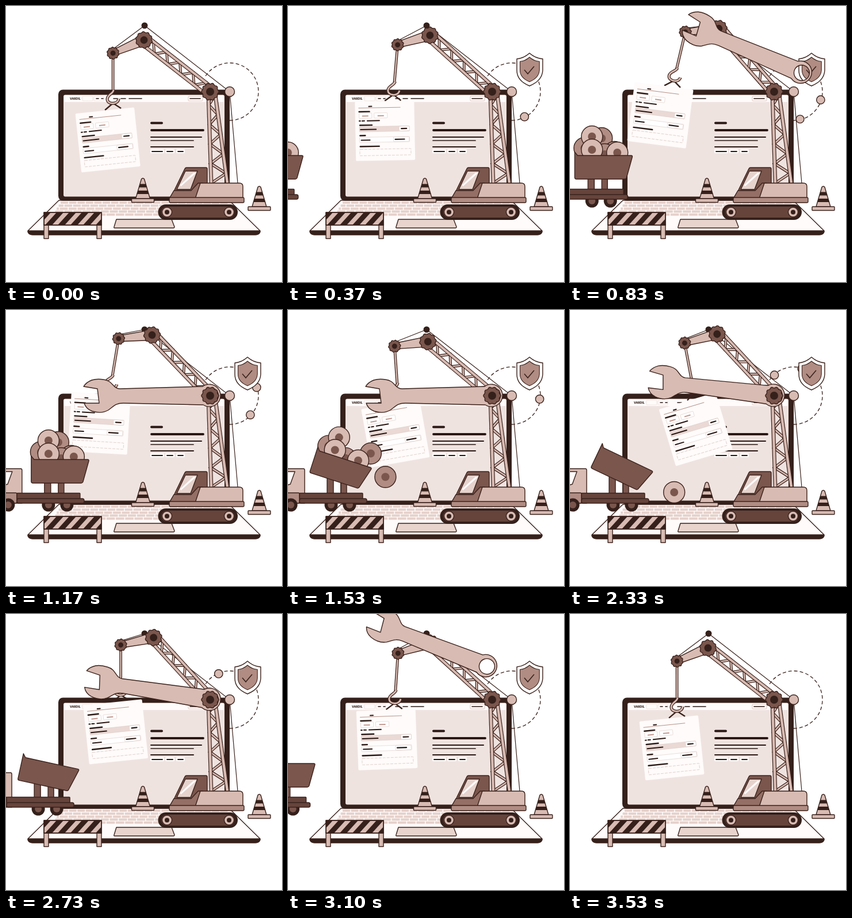
Recreate the animation shown at these times as an HTML page. Size 480x480 px, loop 3560 ms.

```html
<!DOCTYPE html>
<html lang="en">
<head>
<meta charset="utf-8">
<title>Site under construction</title>
<style>
  html, body { margin: 0; width: 100%; height: 100%; overflow: hidden; background: #fff; }
  svg { display: block; width: 100vw; height: 100vh; }
  .o { stroke: #3b221c; stroke-width: 1.4; stroke-linejoin: round; }
  .n { fill: none; }
  .dark { fill: #35201b; }
  .deep { fill: #66443b; }
  .brown { fill: #7a564d; }
  .mid { fill: #b08c83; }
  .light { fill: #d8bbb2; }
  .pale { fill: #fefbfa; }
  text { font: 800 5px Inter, Arial, sans-serif; fill: #35201b; }
</style>
</head>
<body>
<svg id="stage" viewBox="0 0 480 480"></svg>
<script>
const LOOP = 3560, INK = '#3b221c', PINK = '#d8bbb2';
const stage = document.getElementById('stage');

// Markup helpers
const path = (d, cls, extra = '') => `<path d="${d}" class="${cls}" ${extra}/>`;
const rect = (x, y, w, h, cls, r = 0, extra = '') =>
  `<rect x="${x}" y="${y}" width="${w}" height="${h}" rx="${r}" class="${cls}" ${extra}/>`;
const disc = (x, y, r, cls) => `<circle cx="${x}" cy="${y}" r="${r}" class="${cls}"/>`;
const line = (d, w, color = INK, extra = '') =>
  `<path d="${d}" fill="none" stroke="${color}" stroke-width="${w}" ${extra}/>`;
const bar = (d, w) => line(d, w + 2.4) + line(d, w, PINK);
const dash = (x, y, w, h = 2) => line(`M${x},${y}h${w}`, h, '#2a1814', 'stroke-linecap="round"');
const group = (id, body, extra = '') => `<g id="${id}" ${extra}>${body}</g>`;
const range = n => [...Array(n).keys()];

function gear(x, y, r, core) {
  const pts = range(72).map(i => {
    const a = i * Math.PI / 36, q = r * (.95 + .06 * Math.cos(10 * a));
    return (x + q * Math.cos(a)).toFixed(1) + ',' + (y + q * Math.sin(a)).toFixed(1);
  });
  return path('M' + pts.join('L') + 'Z', 'brown o') + disc(x, y, core, 'dark');
}

// Two rails, each [x1, y1, x2, y2], joined by a zigzag
function truss(a, b, steps, w) {
  const zig = range(steps + 1).map(i => {
    const [x1, y1, x2, y2] = i % 2 ? a : b, k = i / steps;
    return `${x1 + (x2 - x1) * k},${y1 + (y2 - y1) * k}`;
  });
  const rail = r => bar(`M${r[0]},${r[1]}L${r[2]},${r[3]}`, w);
  return bar('M' + zig.join('L'), w * .6) + rail(a) + rail(b);
}

const cone = (x, y) => `<g transform="translate(${x},${y})">` +
  path('M7,35L17,1Q19.5,-2 22,1L32,35Z', 'light o') +
  path('M14.5,9.5h10l2,6h-14zM11,21h17l2,6h-21z', 'dark') +
  rect(0, 35, 39, 6.5, 'light o', 1) + '</g>';

const laptop =
  path('M92,338H388L442,391H38Z', 'pale o') +
  path('M38,391.5H442V393Q440,398 434,398H46Q40,398 38,393Z', 'dark o') +
  range(5).map(i => line(`M${95 - i * 3.4},${342 + i * 5.2}H${386 + i * 3}`, 4, '#e6d1cb',
    `stroke-dasharray="${13 + i * .4} 1.6" stroke-dashoffset="${i * 5}"`)).join('') +
  path('M192,371H288L293,384Q293,386 291,386H189Q187,386 188,384Z', 'o', 'fill="#e8d4cc"') +
  rect(91, 145.5, 298, 193, 'dark', 8) +
  rect(100, 154.5, 280, 177, '', 3, 'fill="#efe3e0"') +
  rect(101, 155, 278, 12, 'pale', 2) +
  '<text x="111" y="163">VARDIL</text>' +
  rect(133, 157, 18, 8, 'n', 1, 'stroke="#eadbd7" stroke-width=".7"') +
  rect(153, 157, 17, 8, 'n', 1, 'stroke="#eadbd7" stroke-width=".7"') +
  dash(157, 161, 4, 1.6) + dash(166, 161, 3, 1.6) + dash(187, 161, 7, 1.6) +
  dash(200, 161, 8, 1.6) + dash(214, 161, 22, 1.6) +
  rect(317, 157, 25, 8, 'pale', 1, 'stroke="#cdb3ac" stroke-width=".7"') + dash(320, 161, 18, 1.6) +
  dash(253, 203.5, 18, 4) + dash(253, 216, 90, 3.8) + dash(252, 228, 88) +
  dash(252, 234, 74, 1.7) + dash(252, 245, 74) +
  [[251, 24], [277, 16], [296, 15]].map(([x, w]) =>
    rect(x, 249, w, 7, 'pale', 1) + dash(x + 3, 253, w - 6, 1.8)).join('');

const field = (x, y, w, h, fill = '#fff') =>
  rect(x, y, w, h, '', 1, `fill="${fill}" stroke="#dccbc6" stroke-width=".6"`);
const sheet = rect(0, 0, 103, 103, 'pale', 2) +
  dash(24, 8.5, 5) + line('M6,11H79', .8, '#a87c70') + dash(7, 17.5, 18, 2.4) +
  field(7, 20, 22, 9) + field(33, 20, 23, 9) +
  line('M12,25h11M39,25h11', 2, '#c39a90') +
  dash(7, 33.5, 2) + dash(12, 33.5, 4) + dash(21, 33.5, 21) + dash(8, 41, 21, 2.4) +
  field(7, 43.5, 87, 9, '#ead9d5') + field(76, 44, 18, 8) + dash(9, 48.5, 27) + dash(80, 48, 9, 2.2) +
  dash(8, 59, 9, 2.4) + field(7, 62, 87, 9) + dash(10, 67, 15) + field(66, 62.5, 27, 8) + dash(69, 66.5, 16, 2.2) +
  dash(8, 78, 33, 2.4) + rect(7, 83, 89, 11, 'n', 1, 'stroke="#d5c1bb" stroke-width=".7" stroke-dasharray="5 2"');

const load = bar('M0,0V66', 2.4) +
  line('M0,87L-14,99M0,87L14,96', 2.4) +
  `<g transform="translate(-9,151) rotate(-6) translate(-51.5,-51.5)">${sheet}</g>` +
  bar('M1,64C0,71 -10,72 -10,80C-10,90 9,90 10,79', 2.8);

const shield = 'M0,-28Q10,-19 23,-18V2Q22,20 0,29Q-22,20 -22,2V-18Q-10,-19 0,-28Z';
const badge = path(shield, 'pale o') +
  `<g transform="scale(.75)">${path(shield, 'mid o')}</g>` + line('M-9,1l6,7l11,-13', 1.6);

const wrench = path('M-14,-16L-158,-12C-170,-12 -170,-26 -186,-28Q-198,-30 -207,-27Q-217,-23 -221,-16' +
  'L-197,-12L-194,13H-220Q-217,23 -206,27Q-190,32 -178,25C-168,18 -166,13 -152,13L-13,16' +
  'A19.5,19.5 0 1 0 -14,-16ZM13.5,0A13.5,13.5 0 1 1 -13.5,0A13.5,13.5 0 1 1 13.5,0Z',
  'light o', 'fill-rule="evenodd"');

const cabin =
  rect(264.5, 345, 138.5, 27, 'dark', 13.5) + rect(270, 349, 127.5, 19, 'deep', 9.5) +
  [280, 388].map(x => disc(x, 358.5, 8.5, 'light o') + disc(x, 358.5, 4, 'dark')).join('') +
  path('M284,335L293,320L311,283Q312,281 314,281H348Q350,281 350,284V335Z', 'brown o') +
  path('M284,335L292,321H322L334,308H342L332,335Z', 'o', 'fill="#946f65"') +
  path('M338,308H406Q412,308 412,314V335H329Z', 'light o') +
  rect(284, 333, 130, 9, 'mid o', 2) +
  path('M297,319L312,287H333L321,319Z', 'o', 'fill="#e6d3cd"') +
  path('M303,311L326,290L331,290L304,314Z', 'pale');

const barrier = rect(66, 380, 8, 24.5, 'light o') + rect(158, 380, 8, 24.5, 'light o') +
  rect(66, 359, 100, 22, 'light o') +
  `<g clip-path="url(#board)">${range(6).map(i => path(`M${46 + i * 22},381l20,-22h12l-20,22z`, 'dark')).join('')}</g>` +
  rect(66, 359, 100, 22, 'n o');

// Coin: rest position in the tipper, light or not, moment it starts to slide
const coins = [
  [92, 230, 0, 1332], [62, 247, 0, 1762], [114, 254, 0, 1272], [97, 258, 0, 1600],
  [75, 227, 1, 1900], [75, 250, 1, 1618], [119, 255, 1, 1636]
];
const coin = ([, , light], i) =>
  group('coin' + i, disc(0, 0, 18.5, light ? 'light o' : 'mid o') + disc(0, 0, 7, 'brown'));

const truck =
  path('M-40,276H27Q29,276 29,279V336H-40Z', 'light o') +
  path('M-20,281H12L4,303L-20,309Z', 'pale o') +
  rect(-40, 318, 60, 18, 'mid o', 2) +
  rect(68, 285, 11, 34, 'brown o') + rect(92, 285, 10, 34, 'brown o') +
  [5, 75, 107].map(x => disc(x, 339, 11.5, 'dark') + disc(x, 339, 6, 'brown')).join('') +
  rect(20, 318.5, 110, 10, 'deep o', 1) + rect(20, 328, 117, 8, 'deep o', 3);
const tipper = path('M45,254L50,260H143Q146,260 145,263L135,299Q134,301 132,301H48Q45,301 45,298Z', 'brown o');

stage.innerHTML =
  `<clipPath id="board"><rect x="66" y="359" width="100" height="22"/></clipPath>
   <clipPath id="deck"><rect width="480" height="338"/></clipPath>` +
  laptop +
  line('M389,199A50,50 0 1 0 346.6,122.5', 1.3, INK, 'stroke-dasharray="6 4"') +
  group('dot0', disc(0, 0, 7.2, 'light o')) + group('dot1', disc(0, 0, 7.2, 'light o')) +
  group('badge', badge) +
  line('M241,34L389,149L403,308', 1.2) +
  '<line id="cable" x1="241" y1="34" stroke="#3b221c" stroke-width="1.2"/>' +
  disc(241, 34, 5.5, 'dark') +
  group('load', load) +
  group('boom', truss([0, 8, 146, 8], [0, -8, 146, -8], 10, 4)) +
  group('jib', path('M0,-9L58.5,-5V5L0,9Z', 'light o') + gear(58.5, 0, 10.5, 4.5) + gear(0, 0, 14.5, 6.5)) +
  truss([352, 155, 357, 308], [364, 155, 385, 308], 9, 4.4) +
  disc(389, 149, 8.5, 'light o') +
  group('wrench', wrench) + gear(355, 149, 15, 7) +
  cabin +
  group('spill', coins.map(coin).join(''), 'clip-path="url(#deck)"') +
  group('truck', truck) + group('tipper', tipper) +
  cone(218.5, 300) + cone(421, 314) + barrier;

// Motion
const at = {};
stage.querySelectorAll('[id]').forEach(el => at[el.id] = el);
const put = (id, value) => at[id].setAttribute('transform', value);
const rad = a => a * Math.PI / 180;
const clamp = k => Math.max(0, Math.min(1, k));

// Cosine-eased value through [time, value, time, value, ...]
function ease(t, ...k) {
  if (t <= k[0]) return k[1];
  for (let i = 2; i < k.length; i += 2)
    if (t < k[i]) {
      const p = (t - k[i - 2]) / (k[i] - k[i - 2]);
      return k[i - 1] + (k[i + 1] - k[i - 1]) * (1 - Math.cos(p * Math.PI)) / 2;
    }
  return k[k.length - 1];
}

function moveCrane(t) {
  const boom = ease(t, 0, 38, 870, 48.8, 1800, 38, 2510, 48.8, LOOP, 38);
  const droop = boom - ease(t, 0, 15, 870, 43, 2000, 26, 2600, 36, LOOP, 15);
  const swing = ease(t, 0, 0, 900, 13.5, 2000, -15, 3050, 4, LOOP, 0);
  const jx = 355 - 146 * Math.cos(rad(boom)), jy = 149 - 146 * Math.sin(rad(boom));
  const x = jx - 58.5 * Math.cos(rad(droop)), y = jy + 58.5 * Math.sin(rad(droop));
  put('boom', `translate(355,149) rotate(${180 + boom})`);
  put('jib', `translate(${jx},${jy}) rotate(${180 - droop})`);
  put('load', `translate(${x},${y}) rotate(${swing})`);
  at.cable.setAttribute('x2', x);
  at.cable.setAttribute('y2', y - 7);
}

function moveTruck(t) {
  const shift = ease(t, 0, -150, 1240, 0, 2500, 0, 3500, -150);
  const tilt = ease(t, 1150, 0, 1750, 25.5, 2450, 25.5, 3000, 0);
  const sink = ease(t, 1530, 0, 1930, 20); // the heap sags as it empties
  const px = 99, py = 268, c = Math.cos(rad(tilt)), s = Math.sin(rad(tilt));
  put('truck', `translate(${shift},0)`);
  put('tipper', `translate(${shift},0) rotate(${tilt},${px},${py})`);
  coins.forEach(([x, y, , start], i) => {
    const u = Math.max(0, (t - start) / 600), dx = x - px, dy = y - py;
    const cx = px + shift + dx * c - dy * s + 120 * u;
    const cy = py + dx * s + dy * c + sink + 20 * u + 120 * u * u;
    at['coin' + i].style.display = u > 1.5 ? 'none' : '';
    put('coin' + i, `translate(${cx},${cy})`);
  });
}

function moveWrench(t) {
  const left = (1 - clamp((t - 560) / 500)) ** 2, out = clamp((t - 2780) / 640) ** 2;
  const turn = ease(t, 1530, 0, 2700, 9);
  at.wrench.style.display = t < 560 || t > 3420 ? 'none' : '';
  put('wrench', `translate(${356 + 224 * left - 40 * out},${149 - 156 * left - 230 * out}) rotate(${turn + 110 * left + 50 * out})`);
}

function moveBadge(t) {
  put('badge', `translate(420,110) scale(${ease(t, 80, 0, 340, 1, 3230, 1, 3480, 0)})`);
  [100, 700].forEach((start, i) => {
    const a = rad(90 - (t - start) / 10);
    const size = ease(t, start, 0, start + 150, 1, start + 2230, 1, start + 2380, 0);
    put('dot' + i, `translate(${389 + 49 * Math.cos(a)},${149 + 49 * Math.sin(a)}) scale(${size})`);
  });
}

function frame() {
  const t = performance.now() % LOOP;
  moveCrane(t);
  moveTruck(t);
  moveWrench(t);
  moveBadge(t);
  requestAnimationFrame(frame);
}
frame();
</script>
</body>
</html>
```
